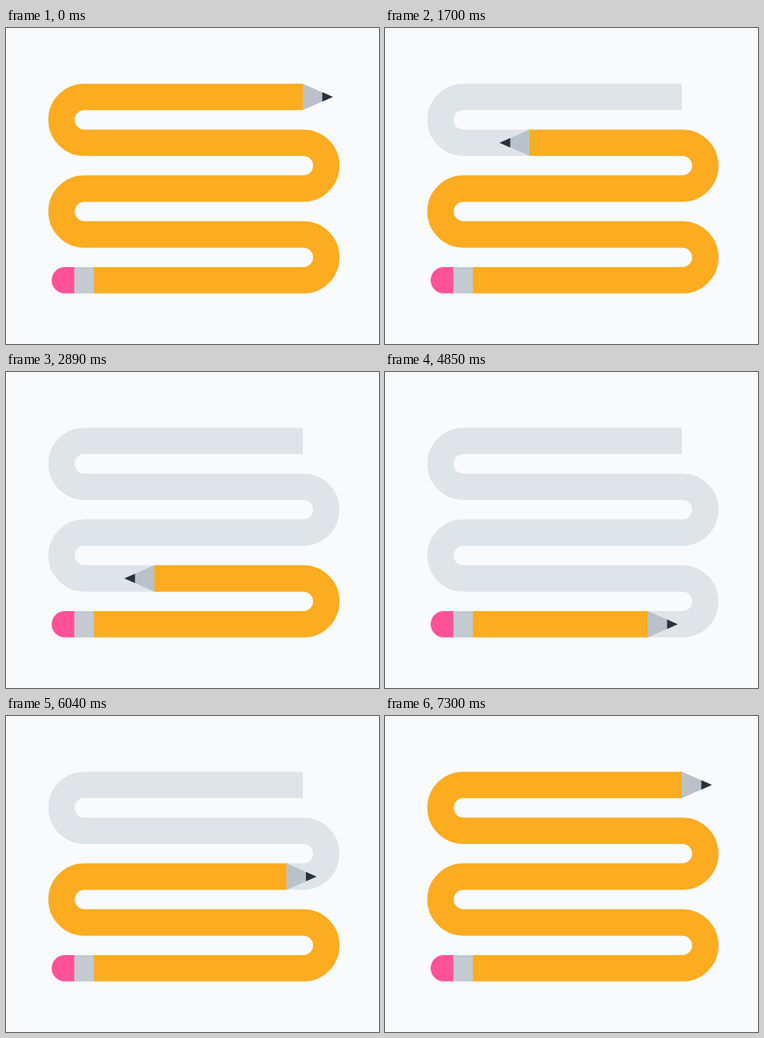
Animation, 490 px wide and 415 px high, one loop 9300 ms. Source, as an HTML page:

```html
<!DOCTYPE html>
<html lang="en">
<head>
<meta charset="utf-8">
<title>Winding pencil</title>
<style>
  html, body { margin: 0; width: 100%; height: 100%; overflow: hidden; background: #f9fafc; }
  svg { display: block; width: 490px; height: 415px; }
  .band { fill: none; stroke-width: 34.6; }
</style>
</head>
<body>
<svg viewBox="0 0 490 415">
  <path id="track" class="band" stroke="#dfe4e8"/>
  <path id="body" class="band" stroke="#fcac20"/>
  <path fill="#ff5299" d="M90 314H77.3a17.3 17.3 0 0 0 0 34.6H90z"/>
  <path fill="#c3cad1" d="M89.7 314H115.5V348.6H89.7z"/>
  <g id="tip">
    <path fill="#b9c2ca" d="M0 -17.3L39.5 0L0 17.3z"/>
    <path fill="#2b303b" d="M25.5 -6.2L39.5 0L25.5 6.2z"/>
  </g>
</svg>
<script>
const LOOP = 9300, STEP = 70, STEPS = 36;
const SHRINK_AT = 1000, GROW_AT = 4850;

const [track, body, tip] = ['track', 'body', 'tip'].map(id => document.getElementById(id));

// Runs from the ferrule up to the sharpened end.
const turnRight = 'H390.7a30.1 30.1 0 0 0 0 -60.2';
const turnLeft = 'H103a30.1 30.1 0 0 1 0 -60.2';
const route = 'M115 331.3' + (turnRight + turnLeft).repeat(2) + 'H390';
track.setAttribute('d', route);
body.setAttribute('d', route);
const total = body.getTotalLength();

// [step, length used up]
const pace = [[0, 0], [7, 288], [11, 468.6], [18, 786], [28, 1238], [35, 1574], [36, 1619]];

function usedAt(step) {
  const i = Math.max(1, pace.findIndex(([s]) => s >= step));
  const [s0, u0] = pace[i - 1], [s1, u1] = pace[i];
  return u0 + (u1 - u0) * (step - s0) / (s1 - s0);
}

function stepsSince(start, t) {
  return Math.max(0, Math.min(STEPS, Math.floor((t - start) / STEP) + 1));
}

function draw() {
  const t = performance.now() % LOOP;
  const left = total - usedAt(stepsSince(SHRINK_AT, t) - stepsSince(GROW_AT, t));
  const end = body.getPointAtLength(left);
  const before = body.getPointAtLength(left - 0.5);
  const after = body.getPointAtLength(left + 0.5);
  const angle = Math.atan2(after.y - before.y, after.x - before.x) * 180 / Math.PI;
  body.setAttribute('stroke-dasharray', `${left} ${total + 10}`);
  tip.setAttribute('transform', `translate(${end.x} ${end.y}) rotate(${angle})`);
  requestAnimationFrame(draw);
}
draw();
</script>
</body>
</html>
```
